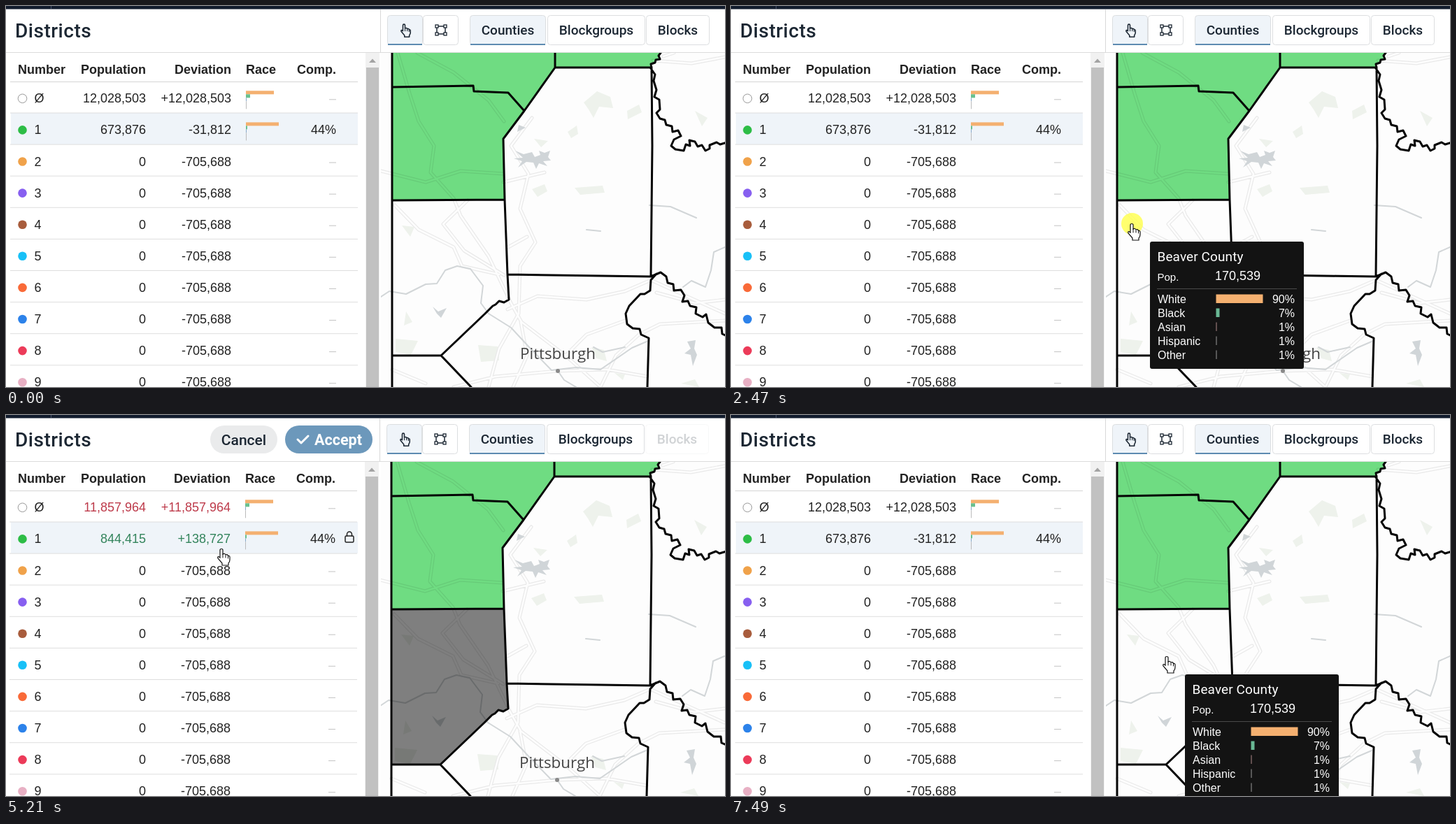
These frames come from a looping animation (1028 px wide and 545 px high, 8 s). An HTML page:

```html
<!DOCTYPE html>
<html lang="en">
<head>
<meta charset="utf-8">
<title>District editor</title>
<style>
html, body { margin: 0; width: 100%; height: 100%; overflow: hidden; background: #fff; }
svg { display: block; }
text { font: 18px "Liberation Sans", Arial, sans-serif; fill: #222; white-space: pre; }
.b { font-weight: 700; }
.e { text-anchor: end; }
.m { text-anchor: middle; }
.ui { font: 500 19px Roboto, sans-serif; fill: #1c2733; }
.tip text { fill: #fff; font-size: 16px; }
.tip .ui { font-size: 19px; font-weight: 400; letter-spacing: .1px; }
.line { fill: none; stroke-linejoin: round; stroke-linecap: round; }
</style>
</head>
<body>
<svg id="stage" width="1028" height="545" viewBox="0 0 1028 545"></svg>
<script>
const stage = document.getElementById('stage');
const text = (x, y, s, cls = '', more = '') => `<text x="${x}" y="${y}" class="${cls}" ${more}>${s}</text>`;
const rect = (x, y, w, h, fill, more = '') => `<rect x="${x}" y="${y}" width="${w}" height="${h}" fill="${fill}" ${more}/>`;
const line = (d, color, width) => `<path class="line" d="${d}" stroke="${color}" stroke-width="${width}"/>`;
const area = (d, fill, more = '') => `<path d="${d}" fill="${fill}" ${more}/>`;

// Map
const roads = `M560 67L577 125 590 165 612 200 607 238 640 275 650 300 690 358 722 425 737 452 800 500 850 545
  M536 236L600 252 650 236 711 240 M588 67L640 95 690 135 712 165
  M556 285L590 320 640 345 652 372 705 384 M660 278L625 312 655 350 712 385
  M752 160L722 200 747 240 735 290 757 338 735 372 733 440 705 490 690 545 M711 252L770 238 M745 330L718 345
  M717 434L760 415 830 420 885 408 922 392 1028 440 M850 545L872 500 905 470 935 455 1028 450
  M800 500L830 470 885 450 M736 452L745 500 725 545 M640 545L700 530 789 522 860 520 917 530
  M925 78L980 82 1028 73 M940 72L955 67 M552 520L600 540 M930 410L985 425 1028 420`;
const rivers = `M536 416L548 408 572 412 600 398 616 397 628 378 645 372 664 376 682 400 679 425 690 440 722 460 748 488 780 521 815 517 850 520 895 489 916 480
  M1028 345L1012 352 1008 378 1000 402 980 393 968 402 M830 320L850 322 M920 285L950 287 987 303
  M789 522L798 535 815 545 M840 488L853 495 885 488`;
const lakes = `M728 207L740 212 752 209 756 216 764 213 762 207 770 210 778 207 775 216 779 221 768 222 774 229 762 225 758 233 754 224 744 223 732 231 738 222 726 218 739 217Z
  M610 430L618 437 630 432 622 446 616 440Z M974 480L986 478 984 490 988 499 982 515 979 499 970 497 979 490Z M733 170l10 4-12 6z`;
const parks = `M826 138L845 122 864 130 868 146 848 144 840 160 833 148Z M888 150l17-9 4 11-20 10z M803 180l13-9 2 12-10 6z
  M752 262l18-7 4 10-14 8z M813 260l40-3 3 10-35 3z M675 485l28 2 2 20-26 2z M837 488l18 4 4 16-15-4z
  M557 476l32 3-10 20-22-4z M566 314l18 2-6 14z M985 150l18 10-8 12z M572 437l9 15-12 5z M755 190l20 3-10 9z M870 525l15 2-3 8z M965 540l20-6 6 11z`;
const beaver = 'M552 278L713 277 716 384 719 420 712 424 705 422 700 427 696 429 685 440 622 500 552 500Z';
const greens = 'M552 67H936L932 76 923 82 923 88H785L741 150 711 190 713 277 552 278Z';
const borders = `M552 67V545 M552 116L668 114 669 122 718 124 741 150 M785 67V88
  M936 67l-3 4 2 5-6 1-1 4-6 2 1 5H785L741 150 711 190 713 277 552 278
  M713 277L717 384 922 387 M717 384l2 36-7 4-7-2-5 5-4 2-11 11L622 500H552 M622 500L665 545
  M923 88L924 200 922 386
  M921 88l7 10-2 9 4 13-3 10 7 4 1 14-5 5 5 8 7 2 2 7 8 2 1 8 8-2 4 8-10 5-4 9 6 5 12 2 3-9 6 2-1-8 8 2 4 7 6-2 5 8 6-3 0-5 10-4 5 3 10-3
  M922 387l14-6 8 6 2 9 8 2 1 9 10-1 5 8-3 9 8-1 3 7 9 2-1 9 10 5 5-4 3 12 9 7 10 0 1 9 9 4 5-5
  M930 383l-8 9-1 15-8 5-6 0-16 17-5 11 2 15 8 6 10 1 2 8 11 5-2 70`;
const map = `<svg x="536" y="67" width="492" height="478" viewBox="536 67 492 478"><g class="shift">
  ${rect(530, 60, 500, 490, '#fdfdfd')}${area(parks, '#eef2ec')}${line(roads, '#e9e9e9', 5)}${line(roads, '#fdfdfd', 2.6)}
  ${line(rivers, '#d2d6d8', 2)}${area(lakes, '#d0d5d8')}
  ${area(greens, '#70de83', 'style="mix-blend-mode:multiply"')}
  ${area(beaver, '#808080', 'class="picked" style="mix-blend-mode:multiply"')}
  ${line(borders, '#050505', 3)}
  ${text(789, 505, 'Pittsburgh', 'm', 'style="font:22.4px \'Open Sans\',sans-serif;fill:#444"')}
  <circle cx="789" cy="522" r="3" fill="#8a8a8a"/></g></svg>`;

// Side panel
const colors = ['#fff', '#2dbd46', '#f0a24a', '#875ff0', '#a85c3c', '#18c0f7', '#f96a38', '#2c82ea', '#ec3b59', '#e8b0c4'];
const rowY = i => 132.3 + 45.1 * i;
const spark = (y, a, b) => rect(343, y - 11, a, 5, '#f4b070') + rect(343, y - 6, b, 5, '#69c08f') +
  rect(343, y - 1, 1, 5, '#88a8c8') + rect(343, y + 4, 1, 11, '#bbb');
const row = i => {
  const y = rowY(i), base = y + 6;
  return `<circle cx="23.5" cy="${y}" r="6.3" fill="${colors[i]}" ${i ? '' : 'stroke="#999"'}/>` +
    text(40.5, base, i || 'Ø') + text(200, base, '0', 'e', `id="pop${i}"`) +
    `<g class="shift">${text(322, base, '-705,688', 'e', `id="dev${i}"`)}` +
    (i == 1 ? text(472, base, '44%', 'e') : rect(462, y + 1, 10, 1, '#c4c4c4')) +
    (i < 2 ? spark(y, [40, 47][i], [6, 2][i]) : '') + rect(6, y + 20.2, 497, 1, '#dedede') + '</g>';
};
const panel = rect(0, 67, 514, 478, '#fff') + text(13, 45, 'Districts', 'ui', 'style="font-size:28px;letter-spacing:.5px"') +
  rect(7, 153, 496, 45, '#eff4f9') + text(17, 97, 'Number', 'b') + text(200, 97, 'Population', 'b e') +
  `<g class="shift">${text(322, 97, 'Deviation', 'b e')}${text(343, 97, 'Race', 'b')}${text(472, 97, 'Comp.', 'b e')}${rect(6, 108, 497, 1, '#d5d5d5')}</g>` +
  colors.map((c, i) => row(i)).join('') +
  `<g class="shift">${rect(514, 67, 20, 478, '#f1f1f1')}${rect(515, 88, 18, 457, '#c1c1c1')}${area('M519 81L524 75.500 529 81Z', '#a3a3a3')}${rect(534, 67, 2, 478, '#fff')}</g>` +
  `<g id="lock" class="line" stroke="#222" stroke-width="1.5"><rect x="485" y="173" width="12" height="9" rx="1.500"/><path d="M487.500 173v-2.500a3.500 3.500 0 0 1 7 0v2.500"/></g>`;

// Toolbar
const button = (x, w, label, on) => rect(x + .5, 13.5, w - 1, 42, on ? '#eff4f9' : '#fff', 'rx="4" stroke="#dcdee0"') +
  (on ? rect(x + 1, 54, w - 2, 2, '#5d8bb1') : '') + text(x + w / 2, 41, label, 'ui m');
const hand = 'M-2 12V1.500Q-2-.5 0-.5T2 1.500V7Q5 5.500 6 8 9 7 9.500 9.500 12 9 12 11.500V15Q12 18 10 20V23H1V20L-5 13Q-6 10.500-4 10.500Z';
const toolbar = rect(0, 0, 1028, 4.5, '#111b2d') + rect(64, 0, 1, 4, '#46506a') + rect(0, 66, 1028, 1, '#dcdcdc') +
  `<g class="shift">${rect(535, 5, 1, 62, '#d8d8d8')}${button(545, 51, '', 1)}${button(596, 51, '')}
  <g transform="translate(569 26.500) scale(.77)">${line(hand, '#1c2733', 2)}${line('M2 7V12M6 9V12M9.500 10V13', '#1c2733', 1.500)}</g>
  ${line('M616 29H628V40H616Z', '#1c2733', 1.500)}${[614, 626].map(x => [27, 38].map(y => rect(x, y, 4, 4, '#fff', 'stroke="#1c2733" stroke-width="1.300"')).join('')).join('')}
  ${button(663, 109, 'Counties', 1)}${button(774, 140, 'Blockgroups')}<g id="blocks">${button(915, 91, 'Blocks')}</g></g>
  <g class="picked">${rect(292, 15, 96, 40, '#eaebec', 'rx="20"')}${text(340, 43, 'Cancel', 'ui m', 'style="font-size:21px"')}
  ${rect(399, 15, 125, 40, '#6c98bb', 'rx="20"')}${line('M417 35L422 40 432 30', '#fff', 3)}
  ${text(475, 43, 'Accept', 'ui m', 'style="font-size:21.500px;font-weight:700;fill:#fff"')}</g>`;

// Tooltip and pointers
const races = [['White', 90, 67, '#f4b070'], ['Black', 7, 5, '#69b894'], ['Asian', 1, 1, '#b08a8a'], ['Hispanic', 1, 1, '#999'], ['Other', 1, 1, '#999']];
const tooltip = `<g id="tip" class="tip">${rect(0, 0, 220, 182, '#131313', 'rx="3"')}
  ${text(10.5, 27.5, 'Beaver County', 'ui')}${text(10.5, 55.5, 'Pop.', '', 'style="font-size:15px"')}${text(93, 55, '170,539', '', 'style="font-size:18px"')}
  ${rect(10, 67, 200, 1, '#4a4a4a')}${races.map(([name, pct, w, c], i) =>
    text(11, 88 + 20 * i, name) + rect(94.5, 75.5 + 20 * i, w, 12.5, c) + text(207, 88 + 20 * i, pct + '%', 'e')).join('')}</g>`;
const pointers = `<circle id="click" cx="573.500" cy="311.500" r="15.500" fill="#ffff4a" fill-opacity=".8"/>
  <g id="hand"><path d="${hand}" fill="#fff" stroke="#111" stroke-width="1.200"/>${line('M2 7V12M6 9V12M9.500 10V13', '#111', 1)}</g>
  <path id="arrow" d="M0 0V20L4.500 16 8 23 11.500 21.500 8.500 14.500H14.500Z" fill="#111" stroke="#fff"/>`;

stage.innerHTML = rect(0, 0, 1028, 545, '#fff') + map + panel + toolbar + tooltip + pointers;

const $ = id => document.getElementById(id);
const show = (el, on) => el.style.display = on ? '' : 'none';
const move = (el, x, y) => el.setAttribute('transform', `translate(${Math.round(x)} ${Math.round(y)})`);
const totals = {
  pop0: ['12,028,503', '11,857,964', '#bd3a4a'], dev0: ['+12,028,503', '+11,857,964', '#bd3a4a'],
  pop1: ['673,876', '844,415', '#33845c'], dev1: ['-31,812', '+138,727', '#33845c']
};
// Pointer keys: time, x, y
const keys = [
  [510, 738, 535], [960, 617, 387], [1290, 576, 316], [1540, 573, 311],
  [3240, 573, 311], [3480, 516, 275], [3700, 400, 195], [3900, 330, 172], [4060, 307, 189],
  [4310, 307, 189], [4700, 266, 189], [5140, 306, 190], [5210, 308, 191], [5580, 248, 190], [5990, 302, 189], [6060, 304, 189],
  [6560, 304, 189], [6620, 340, 205], [6900, 520, 285], [7040, 600, 333], [7170, 623, 347], [7370, 623, 347], [7490, 623, 345], [8000, 623, 345]
];
function pointer(t) {
  const i = Math.max(1, keys.findIndex(k => k[0] > t));
  const [a, b] = [keys[i - 1], keys[i]];
  const u = Math.max(0, (t - a[0]) / (b[0] - a[0]));
  return [a[1] + (b[1] - a[1]) * u, a[2] + (b[2] - a[2]) * u];
}

function draw(t) {
  const picked = t >= 2790 && t < 7370;
  document.querySelectorAll('.picked').forEach(el => show(el, picked));
  document.querySelectorAll('.shift').forEach(el => move(el, picked ? -1 : 0, 0));
  $('blocks').setAttribute('opacity', picked ? .2 : 1);
  for (const id in totals) {
    const [before, after, color] = totals[id];
    $(id).textContent = picked ? after : before;
    $(id).style.fill = picked ? color : '';
  }
  const [x, y] = pointer(t), active = t >= 510, onBar = x > 500 && x < 536;
  show($('hand'), active && !onBar);
  show($('arrow'), active && onBar);
  move($('hand'), x, y + 1);
  move($('arrow'), x, y);
  show($('tip'), active && (t < 3540 || x >= 536));
  if (x < 534) move($('tip'), 560, 317);
  else move($('tip'), x + 26, y + 26);
  show($('click'), t >= 2470 && t < 2610);
  show($('lock'), t >= 3700 && t < 6690);
}

const start = performance.now();
function frame() {
  draw((performance.now() - start) % 8000);
  requestAnimationFrame(frame);
}
frame();
</script>
</body>
</html>
```
